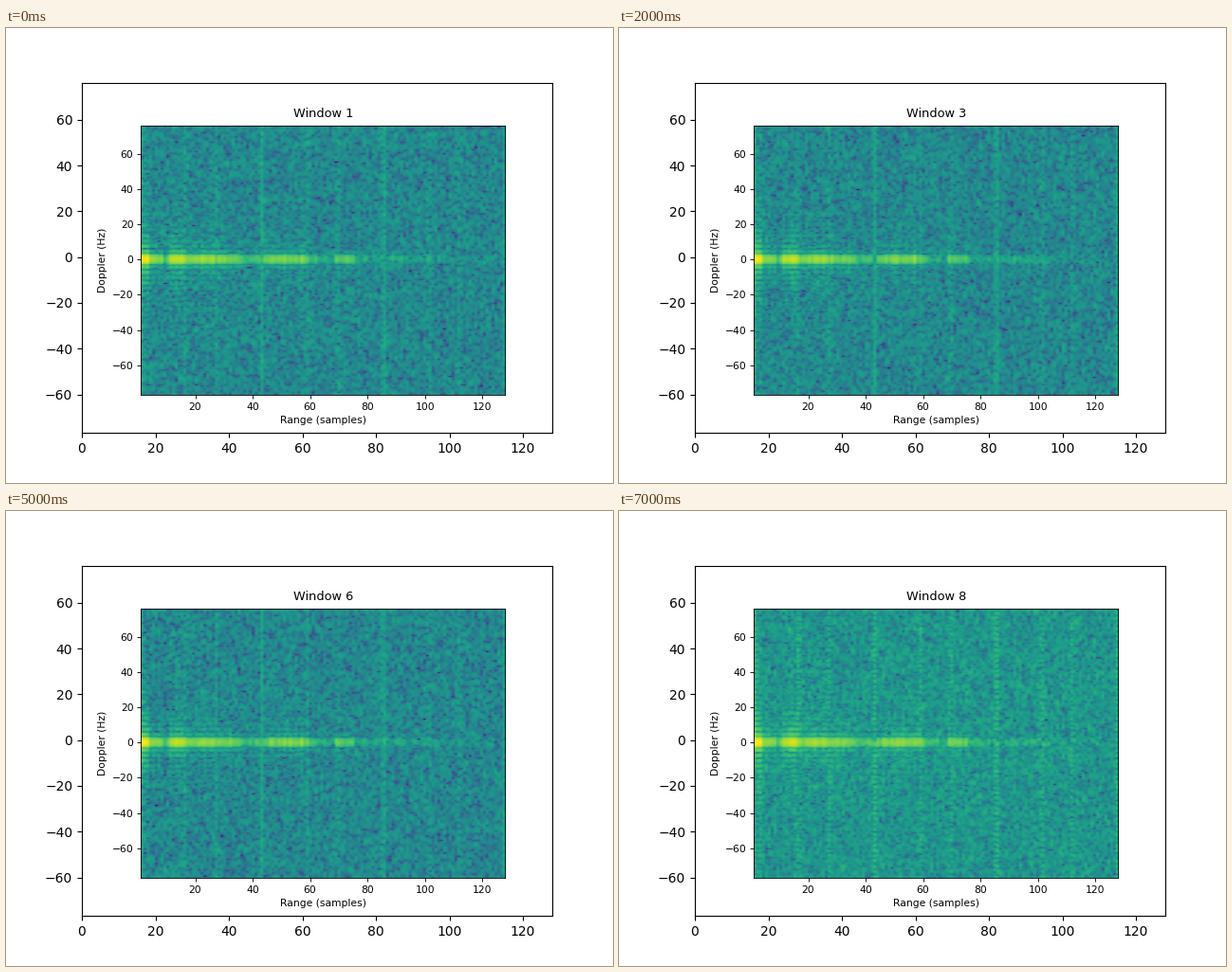
Write a matplotlib script that moves like this. It is 640 by 480 pixels and loops after 8000 ms.

```python
import numpy as np
import matplotlib.pyplot as plt
from matplotlib.animation import FuncAnimation

W, H, DPI = 640, 480, 100
WINDOWS = 8
BINS, RANGES, PULSES = 256, 128, 51
STEP = .6               # Doppler bin width in Hz
LOBE = 3.0              # sidelobe spacing in Hz
DB_SPAN = 77.0          # dB covered by the whole colour map
SCALE = .7725           # inner plot is a shrunken figure

plt.rcParams["font.family"] = "DejaVu Sans"

ranges = np.arange(1, RANGES + 1)
doppler = (np.arange(BINS) - BINS // 2) * STEP
limits = doppler[0], doppler[-1]

# Colour level of the clutter along zero Doppler, as (range, level)
PROFILE = [(1, 1), (3, .98), (4, .84), (8, .82), (9, .7), (11, .88), (15, .93),
           (17, .82), (22, .86), (35, .79), (37, .7), (43, .72), (46, .82),
           (57, .81), (59, .71), (68, .58), (69, .77), (75, .73), (77, .6),
           (102, .6), (105, .52), (128, .46)]
clutter = np.interp(ranges, *np.array(PROFILE).T)
clutter += np.random.default_rng(5).normal(0, .025, RANGES) * (ranges > 16)


def streak(center, strength):
    return strength * np.exp(-((ranges - center) / .8) ** 2)


# Broadband streaks at each third of the range, with weaker ones beside them
streaks = sum(streak(k * RANGES / 3 + .3 + d, 1.3 if d else 2.2)
              for k in range(4) for d in (-16, 0, 16))

# Narrow flat-topped echo on top of the sidelobes
response = np.sinc(doppler / LOBE) + .5 * np.exp(-(doppler / LOBE) ** 6)


def phases(rng):
    return np.exp(2j * np.pi * rng.random(RANGES))


def spectrum(window):
    """Colour levels of one range-Doppler map."""
    rng = np.random.default_rng(40 + window)
    noise = rng.normal(size=(PULSES, RANGES)) + 1j * rng.normal(size=(PULSES, RANGES))
    field = np.fft.fft(noise / np.sqrt(2 * PULSES), BINS, axis=0)

    level = clutter + rng.normal(0, .01, RANGES) * (1 + ranges / 60)
    echo = 10 ** ((level - .5) * DB_SPAN / 20) / response.max()
    field += response[:, None] * echo * phases(rng)

    wide = streaks + .6 * (ranges < 4)
    if window >= 6:     # the last windows show rippled streaks
        wide = 1.4 * (wide + .2) * np.sin(np.pi * doppler / LOBE)[:, None]
    field += wide * phases(rng)

    value = .5 + 20 * np.log10(np.abs(field) + 1e-3) / DB_SPAN
    contrast = .91 if window % 6 == 1 else 1.02
    return 1 - (1 - value) * contrast


def style(ax, xlim):
    ax.set(xlim=xlim, ylim=limits,
           xticks=range(20 if xlim[0] else 0, 121, 20), yticks=range(-60, 61, 20))


maps = [spectrum(k) for k in range(WINDOWS)]

fig = plt.figure(figsize=(W / DPI, H / DPI), dpi=DPI, facecolor="white")
outer = fig.add_axes([.125, .11, .775, .77])
style(outer, (0, 128))

drop = .6 / H           # settles the frame on whole pixels
inner = fig.add_axes([.125 + .125 * .775, .11 + .11 * .77 - drop,
                      .775 ** 2, .77 ** 2])
image = inner.imshow(maps[0], extent=(1, 128, *limits), origin="lower",
                     aspect="auto", cmap="viridis", vmin=0, vmax=1,
                     interpolation="bilinear")
style(inner, (1, 128))
inner.tick_params(labelsize=10 * SCALE, length=3.5 * SCALE,
                  pad=3.5 * SCALE, width=.8 * SCALE)
for spine in inner.spines.values():
    spine.set_linewidth(.8 * SCALE)
inner.set_xlabel("Range (samples)", fontsize=10 * SCALE, labelpad=4 * SCALE)
inner.set_ylabel("Doppler (Hz)", fontsize=10 * SCALE, labelpad=4 * SCALE)
title = inner.set_title("Window 1", fontsize=12 * SCALE, pad=6)


def update(k):
    image.set_data(maps[k])
    title.set_text(f"Window {k + 1}")
    return image, title


anim = FuncAnimation(fig, update, frames=WINDOWS, interval=1000,
                     repeat=True, repeat_delay=0, blit=False)
plt.show()
```
